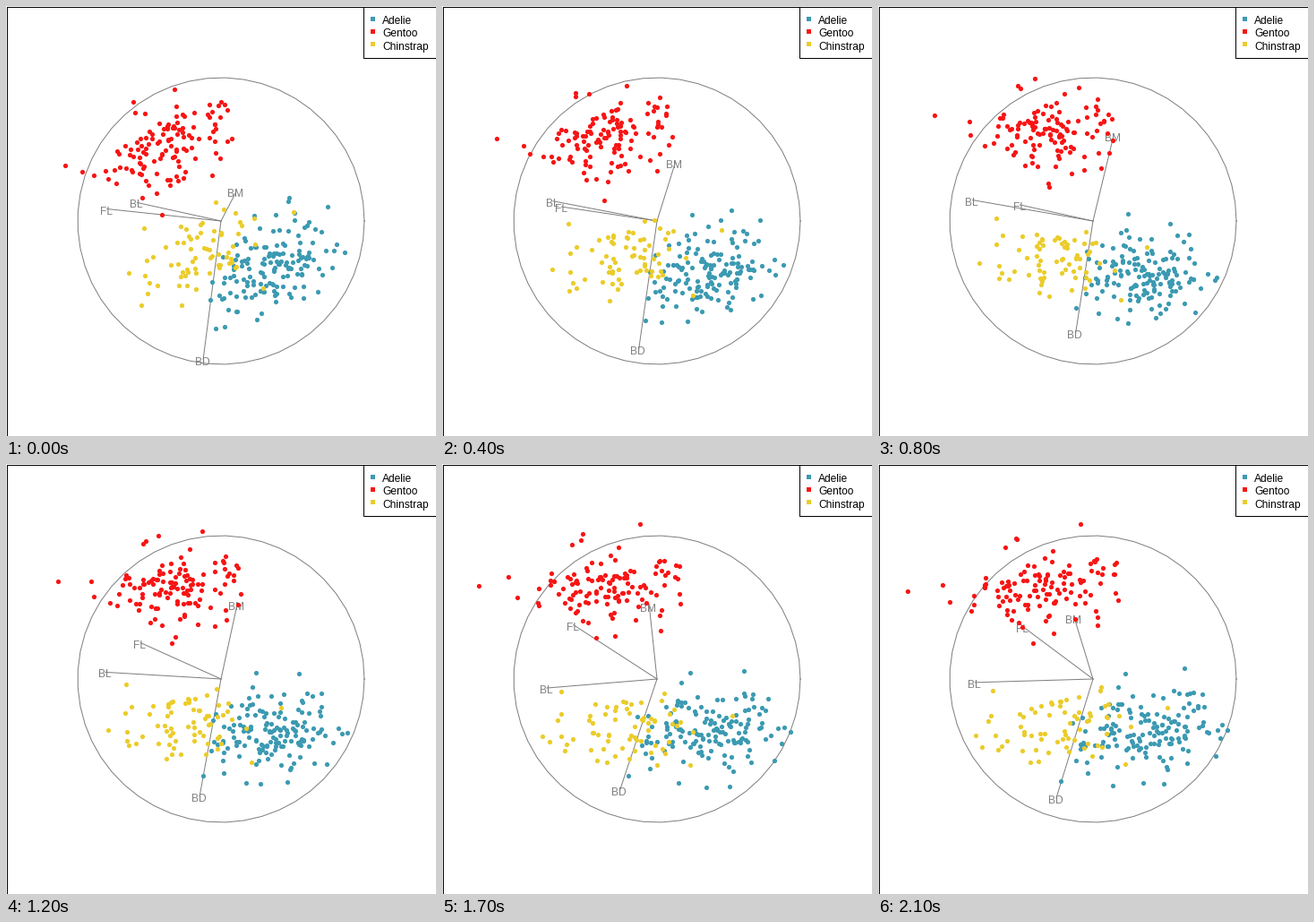
Write a matplotlib script that moves like this. It is 480 by 480 pixels and loops after 2.2 s.

```python
import numpy as np
import matplotlib.pyplot as plt
from matplotlib.animation import FuncAnimation

SIZE, DPI, FRAMES = 480, 100, 22
MID, RADIUS, SPREAD = 240, 160, 0.355
PX = 72 / DPI
GREY = "#7f7f7f"
NAMES = ["BL", "BD", "FL", "BM"]

# Species: colour, count, standardised mean of BL, BD, FL, BM, and one stray bird
SPECIES = {
    "Adelie": ("#3b9ab2", 146, (-0.95, 0.60, -0.78, -0.62), (0.37, 2.2, -0.5, 0)),
    "Gentoo": ("#f81414", 119, (0.65, -1.10, 1.16, 1.10), (2.85, -0.08, 2.07, 2.29)),
    "Chinstrap": ("#ebcc2a", 68, (0.89, 0.64, -0.37, -0.59), (2.16, 1.34, 0.43, -0.26)),
}
SEX_GAP = np.array([0.34, 0.38, 0.25, 0.40])
SD = np.array([0.42, 0.45, 0.40, 0.38])

# Views the tour heads for: frame of arrival, then x and y of each axis tip
VIEWS = {
    0: ((-94, -128, 17, -20), (-20.5, -13.5, -32.5, 154.5)),
    9: ((-137, -80, 23, -19), (-24, -18.5, -97.5, 123.5)),
    14: ((-127, -94, 16, -26), (-1, -48.5, -75.5, 132)),
    18: ((-123.5, -94, -12, -43.5), (11.5, -62.5, -82.5, 123.3)),
    21: ((-133, -79, -21, -41), (3.5, -58.5, -67.5, 132.5)),
}
ORDER = [0, 3, 1, 2]  # tips above are listed as BL, FL, BM, BD
PACE = 11.6


def orthonormal(m):
    u, _, vt = np.linalg.svd(m, full_matrices=False)
    return RADIUS * u @ vt


def tips_at(frame):
    """Walk at an even pace; the last step of a leg is cut short at the view."""
    times = list(VIEWS)
    leg = min(np.searchsorted(times, frame, side="right"), len(times) - 1)
    t0, t1 = times[leg - 1:leg + 1]
    a, b = (orthonormal(np.array(VIEWS[t]).T[ORDER]) for t in (t0, t1))
    part = min(1, (frame - t0) * PACE / np.linalg.norm(b - a))
    return orthonormal(a + part * (b - a))


def make_birds(rng, count, mean):
    """Loosely correlated measurements around a mean."""
    shared = rng.standard_normal((count, 1))
    own = rng.standard_normal((count, 4))
    z = np.clip(0.45 * shared + 0.89 * own, -2.3, 2.3)
    return mean + SD * (z - z.mean(0)) / z.std(0)


rng = np.random.default_rng(11)
birds, colours = [], []
for colour, count, mean, stray in SPECIES.values():
    half = count // 2
    birds += [make_birds(rng, half, mean - SEX_GAP),
              make_birds(rng, count - half - 1, mean + SEX_GAP), [stray]]
    colours += [colour] * count
data = np.vstack(birds) * SPREAD

fig = plt.figure(figsize=(SIZE / DPI, SIZE / DPI), dpi=DPI, facecolor="white")
ax = fig.add_axes([0, 0, 1, 1])
ax.set(xlim=(0, SIZE), ylim=(SIZE, 0))
ax.axis("off")


def line(x, y, colour, z):
    return ax.plot(x, y, color=colour, lw=PX, zorder=z)[0]


def label(x, y, text, colour, z, **kw):
    return ax.text(x, y, text, color=colour, fontsize=12 * PX,
                   family="Liberation Sans", va="baseline", zorder=z, **kw)


angle = np.linspace(0, 2 * np.pi, 50)
line(MID + RADIUS * np.cos(angle), MID - RADIUS * np.sin(angle), GREY, 1)
spokes = [line([], [], GREY, 1) for _ in NAMES]
tags = [label(0, 0, n, GREY, 2, ha="center") for n in NAMES]
dots = ax.scatter(np.zeros(len(data)), np.zeros(len(data)), s=(5.2 * PX) ** 2,
                  c=colours, linewidths=0, zorder=3)

# Legend and outer frame
ax.add_patch(plt.Rectangle((398, 0), 82, 57, fc="white", ec="none", zorder=4))
line([398.5, 398.5, 479.5], [0.5, 57.5, 57.5], "black", 5)
line([0.5, 479.5, 479.5, 0.5, 0.5], [0.5, 0.5, 479.5, 479.5, 0.5], "black", 5)
for i, (name, (colour, *_)) in enumerate(SPECIES.items()):
    ax.add_patch(plt.Rectangle((407, 12 + 14 * i), 5, 5, fc=colour, ec="none",
                               zorder=5))
    label(420, 20 + round(14.4 * i), name, "black", 5)


def draw(frame):
    tips = tips_at(frame)
    for (dx, dy), spoke, tag in zip(tips, spokes, tags):
        spoke.set_data([MID, MID + dx], [MID, MID + dy])
        tag.set_position((MID + dx - 1, MID + dy + 6))
    # Dots sit on whole pixels
    dots.set_offsets(np.floor(MID + data @ tips) + 0.5)
    return [*spokes, *tags, dots]


anim = FuncAnimation(fig, draw, frames=FRAMES, interval=100, repeat=True,
                     repeat_delay=0)
plt.show()
```
